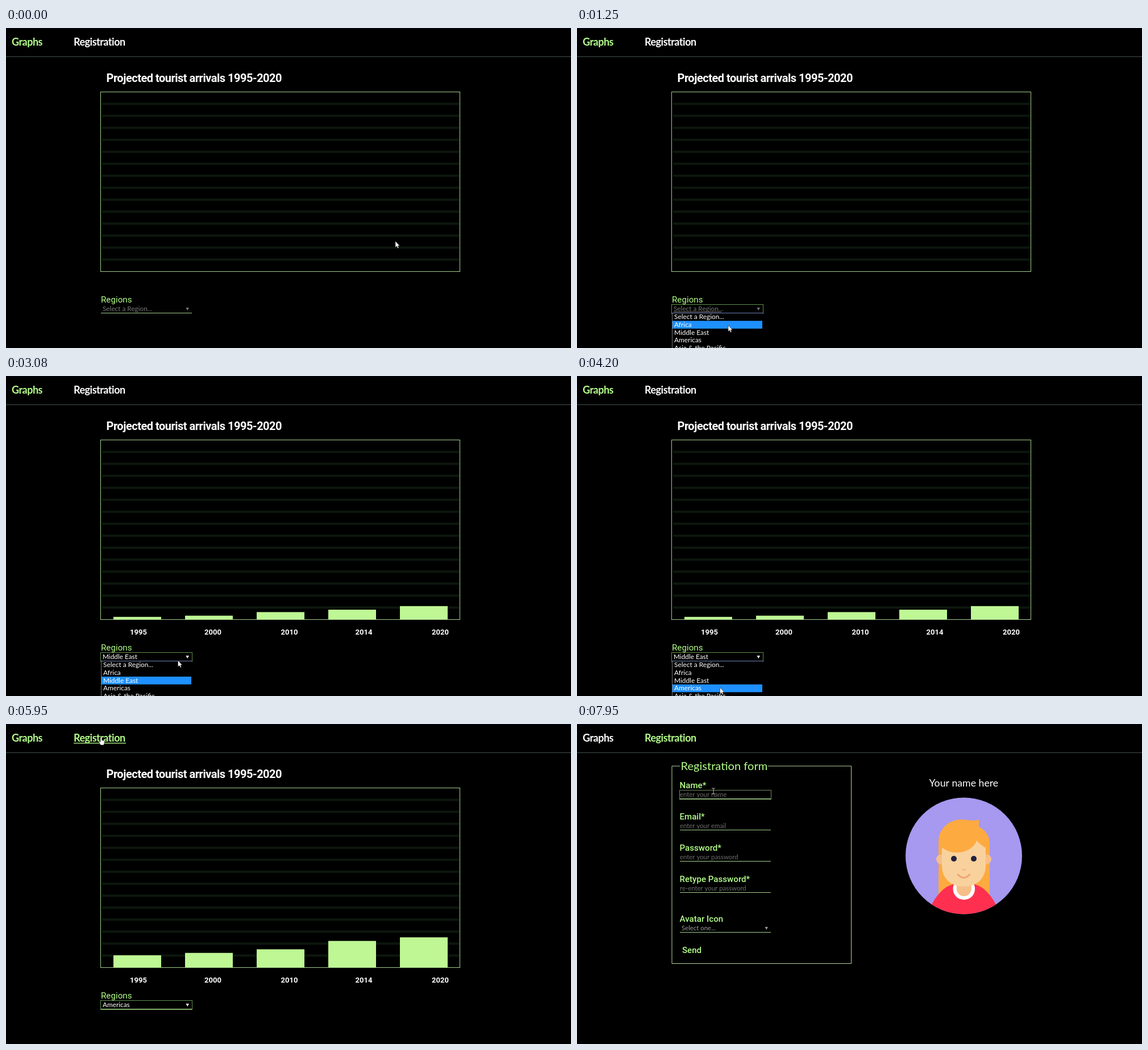
An HTML page with a canvas for the animation above (8000 ms loop, 994 by 563 pixels).

```html
<!DOCTYPE html>
<html lang="en">
<head>
<meta charset="utf-8">
<title>Tourist arrivals</title>
<style>
  html, body { margin: 0; width: 100%; height: 100%; overflow: hidden; background: #000; }
  canvas { display: block; }
</style>
</head>
<body>
<canvas id="stage" width="994" height="563"></canvas>
<script>
const ctx = document.getElementById('stage').getContext('2d');
const LOOP = 8000;
const GREEN = '#b4ff8a', BAR = '#bef794', LINE = '#a3cf8c', GREY = '#777', WHITE = '#fff';
const LATO = 'Lato, sans-serif', ROBOTO = 'Roboto, sans-serif';

const REGIONS = ['Select a Region...', 'Africa', 'Middle East', 'Americas', 'Asia & the Pacific'];
const YEARS = [['1995', 218], ['2000', 349], ['2010', 483.5], ['2014', 614.5], ['2020', 749]];
const ARRIVALS = { 2: [2, 3, 6, 8, 11], 3: [10, 12, 15, 22, 25] };
const FIELDS = [['Name*', 'enter your name'], ['Email*', 'enter your email'],
  ['Password*', 'enter your password'], ['Retype Password*', 're-enter your password']];

// Interaction times in ms
const MENU_OPEN = [[950, 2250], [3050, 4300]];
const PAGE_SWITCH = 5960;

// Pointer path: time, x, y
const PATH = [
  [0, 685, 375], [80, 685, 375], [800, 290, 494], [980, 290, 496], [1250, 266, 523],
  [1910, 266, 523], [2100, 258, 535], [2270, 258, 535], [2700, 378, 424], [2780, 378, 424],
  [3060, 302.5, 500.5], [3250, 302.5, 500.5], [3540, 285, 520], [3620, 285, 520],
  [4000, 251.5, 548], [4300, 251.5, 548], [4410, 188, 466], [4500, 344, 458],
  [4700, 344, 458], [5250, 90, 60], [5420, 167.5, 23.5], [PAGE_SWITCH, 167.5, 23.5],
  [6330, 234, 200], [6420, 234, 200], [7400, 240, 118], [LOOP, 240, 118]
];

function pointerAt(t) {
  const i = PATH.findIndex((p, k) => k > 0 && t <= p[0]);
  const [t0, x0, y0] = PATH[i - 1], [t1, x1, y1] = PATH[i];
  const u = (t - t0) / (t1 - t0), e = u * u * (3 - 2 * u);
  return { x: x0 + (x1 - x0) * e, y: y0 + (y1 - y0) * e };
}

function text(str, x, y, font, color, spacing = 0) {
  ctx.font = font;
  ctx.letterSpacing = spacing + 'px';
  ctx.fillStyle = color;
  ctx.fillText(str, x, y);
}

function rect(x, y, w, h, color) {
  ctx.fillStyle = color;
  ctx.fillRect(x, y, w, h);
}

function frame(x, y, w, h, color) {
  ctx.strokeStyle = color;
  ctx.lineWidth = 1;
  ctx.strokeRect(x + .5, y + .5, w, h);
}

function shape(d, fill, stroke, width = 1) {
  const path = new Path2D(d);
  if (fill) { ctx.fillStyle = fill; ctx.fill(path); }
  if (stroke) { ctx.strokeStyle = stroke; ctx.lineWidth = width; ctx.stroke(path); }
}

function disc(x, y, r, color) {
  ctx.beginPath();
  ctx.arc(x, y, r, 0, Math.PI * 2);
  ctx.fillStyle = color;
  ctx.fill();
}

const inside = (p, x, y, w, h) => p.x >= x && p.x <= x + w && p.y >= y && p.y <= y + h;
const overLink = p => inside(p, 119, 14, 92, 22);
const overInput = p => FIELDS.some((_, i) => inside(p, 180, 116 + 55 * i, 161, 16));

function drawHeader(registering, pointer) {
  const hover = overLink(pointer), font = `bold 18px ${LATO}`;
  rect(0, 0, 994, 1, '#00081a');
  rect(0, 50, 994, 1, '#43524d');
  text('Graphs', 10, 31, font, registering ? WHITE : GREEN, -.5);
  text('Registration', 119, 31, font, registering || hover ? GREEN : WHITE, -.5);
  if (hover) rect(119, 33, 92, 1.3, GREEN);
}

function drawChart(region) {
  text('Projected tourist arrivals 1995-2020', 176.5, 94.5, `bold 20px ${ROBOTO}`, WHITE, -.5);
  for (let i = 1; i < 15; i++) rect(169, 110.4 + 21.07 * i, 629, 4, '#0d170d');
  frame(166, 112, 632, 316, LINE);
  if (!ARRIVALS[region]) return;
  ARRIVALS[region].forEach((value, i) => {
    const h = value * 316 / 150;
    rect(189 + 126 * i, 428 - h, 84, h, BAR);
    text(YEARS[i][0], YEARS[i][1], 455.3, `bold 13px ${ROBOTO}`, WHITE);
  });
}

function drawSelect(region, open, focused) {
  const color = region ? WHITE : GREY;
  text('Regions', 167, 483.2, `15.2px ${ROBOTO}`, GREEN);
  text(REGIONS[region], 170, 498, `11.8px ${LATO}`, color);
  if (open && !region) rect(170, 499, 84, 1, GREY);
  shape('M316.5 492h5.5l-2.75 5z', color);
  if (focused) frame(166, 486, 161, 16, '#5f8f4a');
  rect(167, 501, 160, 1, LINE);
}

function drawMenu(highlight) {
  rect(167, 501, 160, 62, '#000');
  rect(167, 501, 160, 1, '#6f7fb8');
  rect(167, 501, 1, 62, '#777');
  REGIONS.forEach((name, i) => {
    if (i === highlight) rect(168, 501.5 + 13.7 * i, 158, 13.7, '#1e90ff');
    text(name, 171, 512.2 + 13.7 * i, `11.9px ${LATO}`, WHITE);
  });
}

function drawGraphs(t, pointer) {
  const region = t < MENU_OPEN[0][1] ? 0 : t < MENU_OPEN[1][1] ? 2 : 3;
  const open = MENU_OPEN.some(([a, b]) => t >= a && t < b);
  drawChart(region);
  drawSelect(region, open, t >= MENU_OPEN[0][0]);
  if (open) {
    const row = Math.floor((pointer.y - 501.5) / 13.7);
    drawMenu(row >= 0 ? row : region);
  }
}

function drawForm(t) {
  const label = `500 15.1px ${ROBOTO}`, hint = `11.4px ${LATO}`;
  shape('M181 74H167V421.5H482.5V74H336', null, '#b3d69c');
  text('Registration form', 182.5, 81, `20.1px ${LATO}`, GREEN);
  FIELDS.forEach(([name, placeholder], i) => {
    const y = 55 * i;
    text(name, 180.5, 112.5 + y, label, GREEN);
    text(placeholder, 181, 127.5 + y, hint, '#6c6c6c');
    rect(181, 131 + y, 160, 1, LINE);
  });
  frame(180, 116, 161, 16, '#6f8a60');
  if (Math.floor((t - PAGE_SWITCH) / 500) % 2 === 0) rect(181, 118, 1, 12, WHITE);
  text('Avatar Icon', 180.5, 348, label, GREEN);
  text('Select one...', 184, 363, hint, '#999');
  shape('M330.5 357h5.5l-2.75 5z', '#999');
  rect(181, 366, 160, 1, LINE);
  text('Send', 185, 403, label, GREEN);
}

function drawAvatar() {
  const hair = '#fdaa40', skin = '#f9d19c', shade = '#f6bf88';
  text('Your name here', 619.5, 109.5, `17.7px ${LATO}`, WHITE);
  ctx.save();
  ctx.beginPath();
  ctx.arc(680.5, 232, 102.5, 0, Math.PI * 2);
  ctx.clip();
  rect(570, 120, 220, 220, '#a798f0');
  shape('M636 310V208C636 184 655 168 677 168C700 172 726 190 726 212V310Z', hair);
  shape('M620 326C631 301 648 282 668 281H693C713 282 730 301 741 326V340H620Z', '#ff304f');
  disc(680.8, 290, 19.3, WHITE);
  disc(680.8, 290, 13, shade);
  rect(667.8, 276, 26, 14, shade);
  disc(641, 238, 9, shade);
  disc(720, 238, 9, shade);
  shape('M642 200H719V249C719 272 703 286 680.5 286S642 272 642 249Z', skin);
  shape('M636 230V207C636 184 655 168 677 168C688 168 697 172 707 168V181' +
    'C720 187 726 197 726 212V230H719V218Q709 212 703 205C696 226 662 234 642 217V230Z', hair);
  disc(663, 237, 5, '#20213f');
  disc(698, 237, 5, '#20213f');
  shape('M677 255Q680.5 259 684 255', null, '#f4b588', 2.5);
  shape('M669.5 264Q680.5 277 691.5 264', null, '#f0a576', 3);
  ctx.restore();
}

function drawPointer(p, registering) {
  ctx.save();
  ctx.translate(p.x, p.y);
  if (overLink(p)) {
    shape('M-1.5 1Q0 -1 1.2 1V5L5 6Q6 6.5 5.7 9L4.5 13.5H-1L-4 8.5Q-3.5 7 -1.5 8Z', WHITE, '#222', .6);
  } else if (registering && overInput(p)) {
    shape('M-3 -5H-1L0 -4L1 -5H3M0 -4V4M-3 5H-1L0 4L1 5H3', null, '#bbb');
  } else {
    shape('M0 0V11L2.5 8.8L4.2 12.6L6 11.8L4.4 8.2H7.6Z', WHITE, '#222', .6);
  }
  ctx.restore();
}

function render(now) {
  const t = now % LOOP;
  const pointer = pointerAt(t);
  const registering = t >= PAGE_SWITCH;
  rect(0, 0, 994, 563, '#000');
  drawHeader(registering, pointer);
  if (registering) {
    drawForm(t);
    drawAvatar();
  } else {
    drawGraphs(t, pointer);
  }
  drawPointer(pointer, registering);
}

const start = performance.now();
(function tick() {
  render(performance.now() - start);
  requestAnimationFrame(tick);
})();
</script>
</body>
</html>
```
